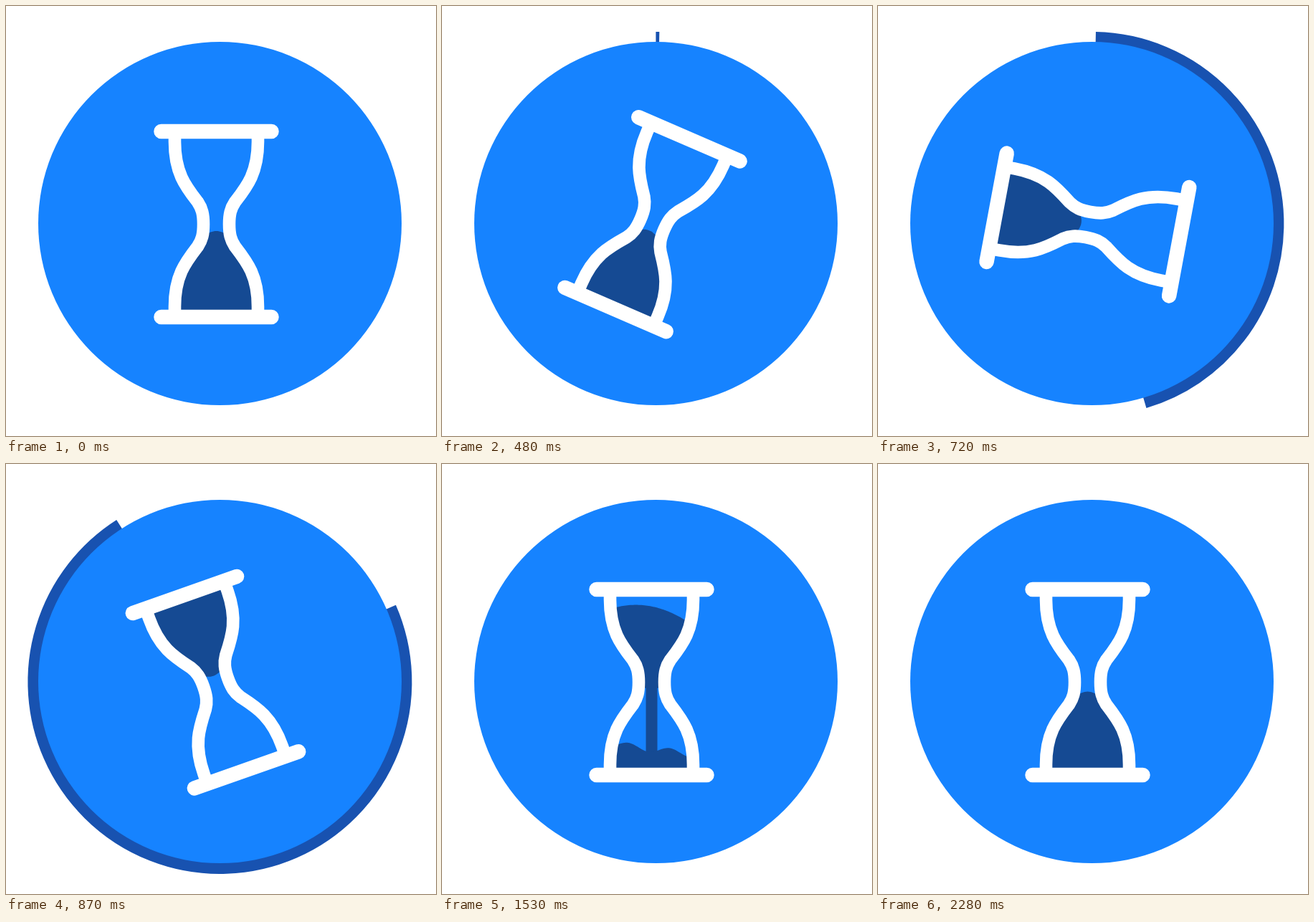
Animation, 600 px wide and 600 px high, one loop 2310 ms. Source, as an HTML page with a canvas:

```html
<!DOCTYPE html>
<html lang="en">
<head>
<meta charset="utf-8">
<title>Hourglass</title>
<style>
  html, body { margin: 0; width: 100%; height: 100%; overflow: hidden; background: #fff; }
  canvas { display: block; width: 600px; height: 600px; }
</style>
</head>
<body>
<canvas id="stage" width="600" height="600"></canvas>
<script>
const ctx = document.getElementById('stage').getContext('2d');
const LOOP = 2310, STEP = 30, TAU = Math.PI * 2;
const BLUE = '#1683ff', RING = '#1852b0', SAND = '#154a93';
const FLOW_START = 1065, LANDING = 1180;

// Left wall centre line; the right wall is the same line turned by half a circle.
const wall = k => {
  const p = (...n) => n.map(v => v * k).join(' ');
  return `${p(-58, -125)} L${p(-58, -115)}
    C${p(-58, -72, -43, -53, -26, -31)} C${p(-20, -22, -18, -14, -18, 0)}
    C${p(-18, 14, -20, 22, -26, 31)} C${p(-43, 53, -58, 72, -58, 115)} L${p(-58, 125)}`;
};
const walls = new Path2D(`M${wall(1)} M${wall(-1)}`);
const inside = new Path2D(`M${wall(1)} L${wall(-1)} Z`);
const bars = new Path2D('M-77 -129.5H77 M-77 129.5H77');
const spill = new Path2D('M58 -118H69L68 -108L62 -96Z');

const clamp = v => Math.min(1, Math.max(0, v));

// Cubic Bezier easing with handles (x1, 0) and (x2, 1).
function ease(t, start, end, x1, x2) {
  const x = clamp((t - start) / (end - start));
  let lo = 0, hi = 1;
  for (let i = 0; i < 24; i++) {
    const s = (lo + hi) / 2, r = 1 - s;
    if (3 * r * r * s * x1 + 3 * r * s * s * x2 + s * s * s < x) lo = s; else hi = s;
  }
  return lo * lo * (3 - 2 * lo);
}

// Fills from the curve y = surface(x) down to the floor.
function fillBelow(surface, floor) {
  ctx.beginPath();
  ctx.moveTo(-60, floor);
  for (let x = -60; x <= 60; x += 2) ctx.lineTo(x, Math.min(floor, surface(x)));
  ctx.lineTo(60, floor);
  ctx.fill();
}

function drawDisc(t) {
  const from = ease(t, 690, 1210, 0.6, 0.4) * TAU;
  const to = ease(t, 450, 1020, 0.58, 0.4) * TAU;
  if (to - from > 0.001) {
    ctx.beginPath();
    ctx.arc(298.4, 304, 258, from - TAU / 4, to - TAU / 4);
    ctx.lineWidth = 20;
    ctx.strokeStyle = RING;
    ctx.stroke();
  }
  ctx.beginPath();
  ctx.arc(298.5, 303.5, 253.5, 0, TAU);
  ctx.fillStyle = BLUE;
  ctx.fill();
}

function drawUpperSand(t) {
  const level = -119.5 + 125 * Math.pow(Math.max(0, (t - 1110) / 1050), 2.4);
  const slosh = clamp((t - 1110) / 300);
  const tip = Math.min(121, -8.5 + 27 * Math.pow((t - 1060) / 50, 1.5));
  fillBelow(x => level + slosh * (0.0045 * (x + 22) ** 2 - 2.3), Math.min(tip, 8));
  const top = Math.max(level, -10);
  if (tip > top) {
    ctx.beginPath();
    ctx.roundRect(-8, top, 16, tip - top, [0, 0, 6, 6]);
    ctx.fill();
  }
}

function drawLowerSand(t) {
  const level = 119.5 - 110 * Math.pow(clamp((t - LANDING) / (LOOP - LANDING)), 1.22);
  const dome = clamp((t - 1530) / 600);
  const rough = clamp((t - LANDING) / 200) * (1 - dome);
  const ripple = x => 0.13 * x - 4.5 * Math.cos(TAU * (x + 33) / 58);
  fillBelow(x => level + dome * 0.025 * x * x + rough * ripple(x), 125);
}

function drawGlass(t) {
  const flowing = t >= FLOW_START;
  const turn = ease(t, 0, 1160, 0.871, 0.41) - (flowing ? 1 : 0);
  ctx.save();
  ctx.translate(293, 304.5);
  ctx.rotate(turn * Math.PI);
  ctx.translate(flowing ? -0.5 : 0.5, 0);

  ctx.fillStyle = SAND;
  if (t >= 1090 && t < LANDING) ctx.fill(spill);
  ctx.save();
  ctx.clip(inside);
  if (flowing) drawUpperSand(t);
  if (!flowing || t > LANDING) drawLowerSand(flowing ? t : LOOP);
  ctx.restore();

  ctx.strokeStyle = '#fff';
  ctx.lineWidth = 17.6;
  ctx.lineCap = 'butt';
  ctx.stroke(walls);
  ctx.lineWidth = 20.5;
  ctx.lineCap = 'round';
  ctx.stroke(bars);
  ctx.restore();
}

function draw() {
  const t = Math.floor(performance.now() % LOOP / STEP) * STEP;
  ctx.clearRect(0, 0, 600, 600);
  drawDisc(t);
  drawGlass(t);
  requestAnimationFrame(draw);
}
draw();
</script>
</body>
</html>
```
